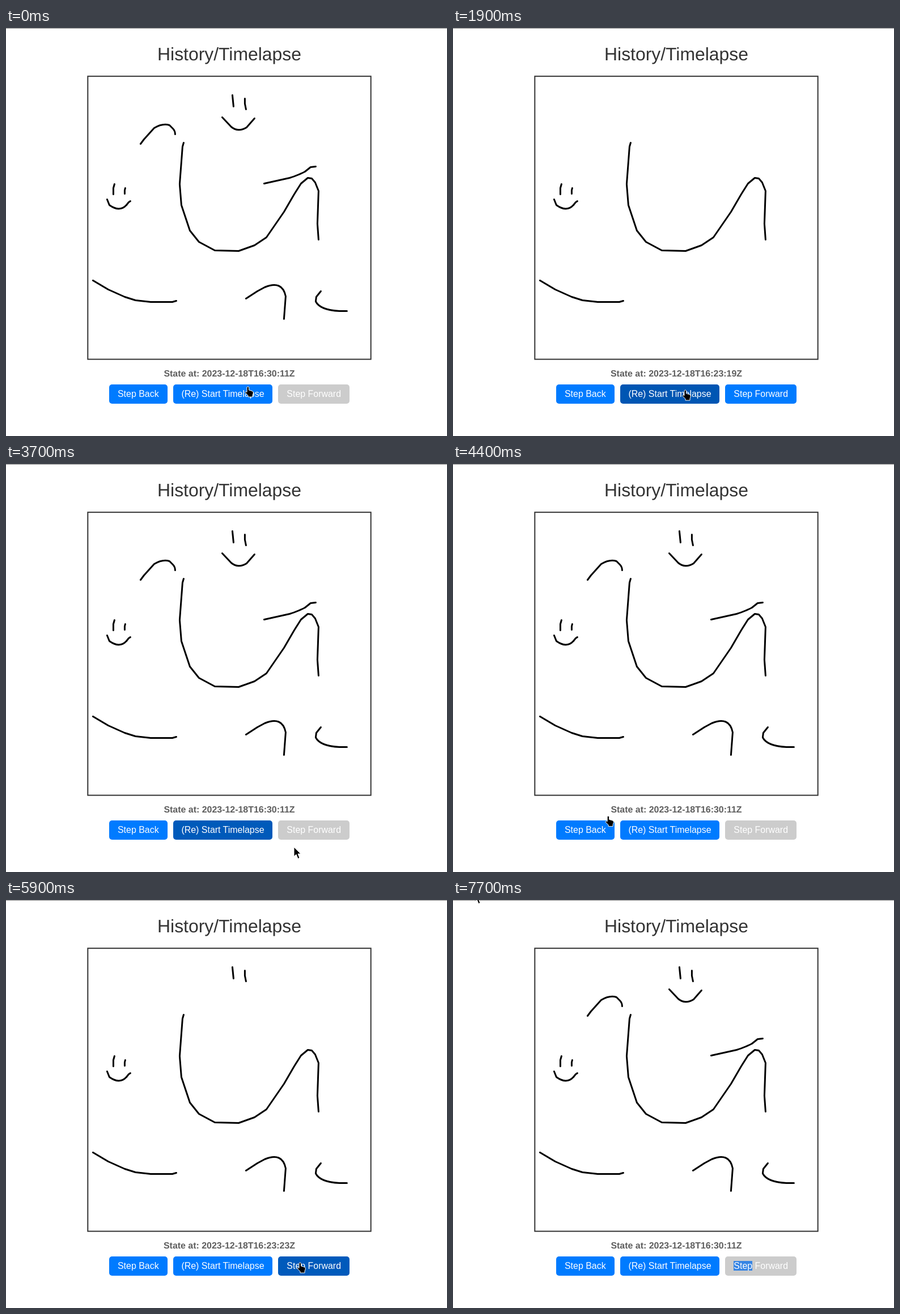
Write an HTML page that moves like this. It is 778 by 720 pixels and loops after 7900 ms.

```html
<!DOCTYPE html>
<html lang="en">
<head>
<meta charset="utf-8">
<title>History/Timelapse</title>
<style>
  html, body { margin: 0; width: 778px; height: 720px; overflow: hidden; background: #fff; }
  body { position: relative; font: 15.94px/18px "Liberation Sans", Arial, sans-serif; text-rendering: geometricPrecision; }
  h1, p, nav { position: absolute; left: 0; width: 788px; margin: 0; text-align: center; }
  h1 { top: 28px; font-size: 31.88px; line-height: 37px; font-weight: 400; color: #333; }
  p { top: 601.5px; font-weight: 700; color: #5e5e5e; }
  nav { top: 629px; display: flex; justify-content: center; gap: 10px; }
  button { padding: 8px 14.9px; height: 34px; border: 0; border-radius: 5px; color: #fff; font: inherit; white-space: nowrap; }
  .sel { background: #3584e4; }
  svg { position: absolute; left: 0; top: 0; }
  #strokes { fill: none; stroke: #000; stroke-width: 3; stroke-linecap: round; stroke-linejoin: round; }
  #cursor { stroke: #fff; stroke-linejoin: round; }
</style>
</head>
<body>
<h1>History/Timelapse</h1>
<p id="stamp"></p>
<nav>
  <button><span id="backText">Step <span id="backWord">Back</span></span></button>
  <button>(Re) Start Timelapse</button>
  <button><span id="stepWord">Step</span> Forward</button>
</nav>
<svg width="778" height="720">
  <path d="M0 .5H778" stroke="#888"/>
  <rect x="144.3" y="85.2" width="499.4" height="499.4" fill="none" stroke="#333" stroke-width="2"/>
  <!-- Each group is one drawing session, one stroke per second -->
  <g id="strokes" transform="translate(.4 .5)">
    <g data-start="11:13">
      <path d="M313 202L311 209 306 275 309 312 324 357 340 377 368 392 410 393 438 383 459 369 490 324 508 293 520 274 532 264 539 265 545 272 551 287 549 345 551 373"/>
      <path d="M191 275L189 282V293"/>
      <path d="M210 282L209 286V292"/>
      <path d="M178 302L182 312Q200 325 212 312"/>
      <path d="M212 312L216 307 219 305"/>
    </g>
    <g data-start="23:19">
      <path d="M153 445L180 461 209 474 228 480 255 483H293L300 481"/>
      <path d="M423 477L443 464 456 457Q487 444 493 473L490 513"/>
      <path d="M555 464L547 474 546 482Q553 497 588 499H601"/>
      <path d="M399 118L401 138"/>
      <path d="M421 124V133L423 143"/>
    </g>
    <g data-start="30:09">
      <path d="M381 157L397 174Q409 184 424 175L438 159"/>
      <path d="M237 204L243 196 261 176Q276 167 288 171L294 177Q298 181 298 187"/>
      <path d="M455 274L500 264Q516 259 527 253L537 245 546 244"/>
    </g>
  </g>
  <g id="cursor">
    <path id="hand" d="M4 2Q5.8-.6 7.6 2V7L13 8.5Q15.4 9.3 15.4 12L14 16V19H6V16.5L1 11.5Q.6 8.6 4 10.5Z"/>
    <path id="arrow" d="M0 0V16.5L4 13 7 20.5 10 19.3 7 12H12Z"/>
  </g>
</svg>
<script>
const LOOP = 7900, STEP = 100, FADE = 300;
const BLUE = [0, 123, 255], DARK = [0, 86, 179], GREY = [204, 204, 204];
const $ = id => document.getElementById(id);
const strokes = [...document.querySelectorAll('#strokes path')];
const buttons = [...document.querySelectorAll('button')];

// When the pointer is over each button
const visits = [{ enter: 4400, leave: 5650 }, { enter: 0, leave: 3690 }, { enter: 5740, leave: 6800 }];

// Pointer glides; bow lifts the middle of the path
const home = { x: 421, y: 632 };
const glides = [
  { from: 0, to: 400, x: 404, y: 638, bow: 0 },
  { from: 3600, to: 3700, x: 508, y: 676, bow: 0 },
  { from: 4000, to: 4600, x: 231, y: 645, bow: 62 },
  { from: 5600, to: 5900, x: 513, y: 639, bow: 0 },
  { from: 7000, to: 7700, x: 38, y: -14, bow: -62 }];

const clamp = (v, lo, hi) => Math.min(hi, Math.max(lo, v));
const between = (t, a, b) => t >= a && t < b;
const mix = (a, b, k) => a.map((v, i) => Math.round(v + (b[i] - v) * k));
const fade = (t, start) => 1 - (1 - clamp((t - start) / FADE, 0, 1)) ** 3;
const ticks = (t, start, every, min, max) => clamp(Math.floor((t - start) / every), min, max);

function strokeCount(t) {
  const played = t < 700 ? strokes.length : ticks(t, 700, 200, 1, strokes.length);
  return played - ticks(t, 4550, 350, 0, 3) + ticks(t, 6100, 200, 0, 3);
}

function stampOf(stroke) {
  const session = stroke.parentNode;
  const [minute, second] = session.dataset.start.split(':');
  const at = +second + [...session.children].indexOf(stroke);
  return `State at: 2023-12-18T16:${minute}:${String(at).padStart(2, '0')}Z`;
}

function pointer(t) {
  let { x, y } = home;
  for (const g of glides) {
    const k = Math.sin(clamp((t - g.from) / (g.to - g.from), 0, 1) * Math.PI / 2);
    x += (g.x - x) * k;
    y += (g.y - y) * k - 4 * g.bow * k * (1 - k);
  }
  return [x, y];
}

function draw(t) {
  const count = strokeCount(t);
  strokes.forEach((s, i) => s.style.display = i < count ? '' : 'none');
  $('stamp').textContent = stampOf(strokes[count - 1]);

  const disabled = 1 - fade(t, 690) + fade(t, 3300) - fade(t, 4950) + fade(t, 6690);
  buttons.forEach((button, i) => {
    const { enter, leave } = visits[i];
    const color = mix(BLUE, DARK, fade(t, enter) - fade(t, leave));
    button.style.background = `rgb(${i === 2 ? mix(color, GREY, disabled) : color})`;
  });
  $('backWord').className = between(t, 5100, 5300) ? 'sel' : '';
  $('backText').className = between(t, 5300, 5600) ? 'sel' : '';
  $('stepWord').className = t >= 6500 ? 'sel' : '';

  const hand = visits.some(v => between(t, v.enter, v.leave));
  $('hand').style.display = hand ? '' : 'none';
  $('arrow').style.display = hand ? 'none' : '';
  $('cursor').setAttribute('transform', `translate(${pointer(t)})`);
}

const start = performance.now();
function tick() {
  const t = (performance.now() - start) % LOOP;
  draw(Math.floor(t / STEP) * STEP);
  requestAnimationFrame(tick);
}
tick();
</script>
</body>
</html>
```
